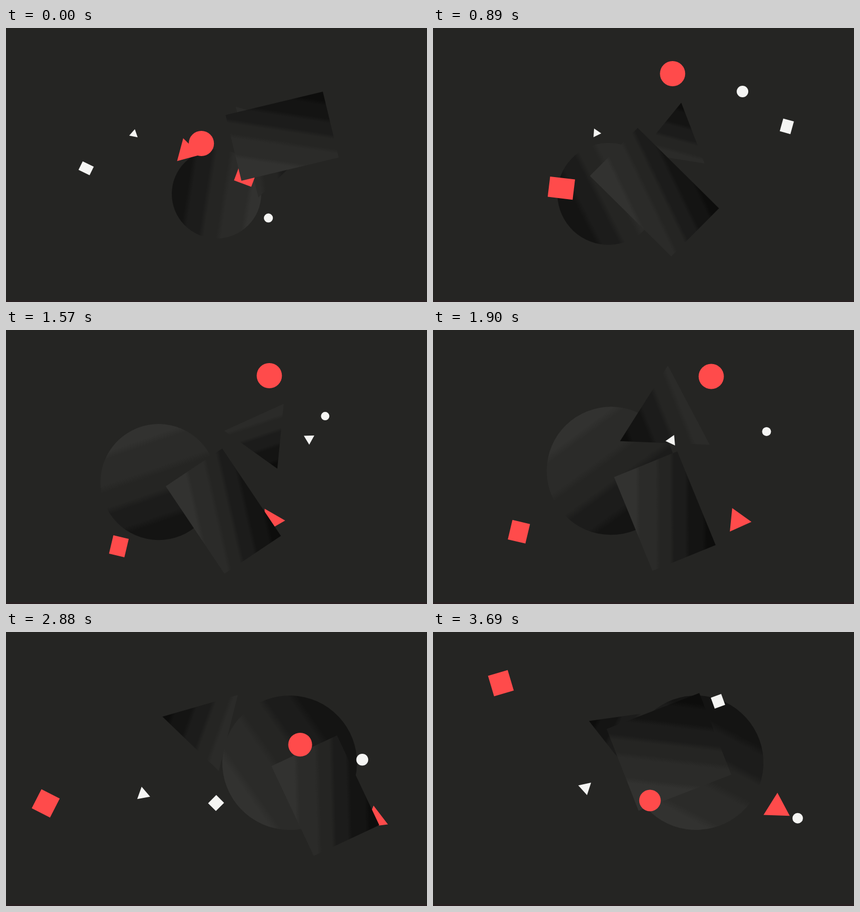
Write an HTML page with a canvas that moves like this. It is 800 px wide and 522 px high and loops after 3.79 s.

```html
<!DOCTYPE html>
<html lang="en">
<head>
<meta charset="utf-8">
<title>Floating shapes</title>
<style>
html, body { margin: 0; width: 100%; height: 100%; overflow: hidden; background: #252523; }
canvas { display: block; }
</style>
</head>
<body>
<canvas id="stage" width="800" height="522"></canvas>
<script>
const ctx = document.getElementById('stage').getContext('2d');
const LOOP = 3790;
const BACK = '#252523', RED = '#ff4b4b', WHITE = '#f5f5f3';
const SHADES = ['#0d0d0c', '#141413', '#1c1c1b', BACK, '#2b2b29', '#323230'];
const EDGES = [0.11, 0.28, 0.43, 0.57, 0.765];
const SOFT = 0.022;

let time = 0;

// Progress from 0 to 1 between two times in ms.
const ramp = (from, to) => Math.min(1, Math.max(0, (time - from) / (to - from)));
const smooth = s => s * s * (3 - 2 * s);
const ease = (from, to) => smooth(ramp(from, to));
const easeOut = (from, to) => Math.sin(ramp(from, to) * Math.PI / 2);
const bump = (center, half) => smooth(Math.max(0, 1 - Math.abs(time - center) / half));

// Soft-edged bands, from dark to light.
function bands(x1, y1, x2, y2) {
  const g = ctx.createLinearGradient(x1, y1, x2, y2);
  g.addColorStop(0, SHADES[0]);
  EDGES.forEach((edge, i) => {
    g.addColorStop(edge - SOFT, SHADES[i]);
    g.addColorStop(edge + SOFT, SHADES[i + 1]);
  });
  return g;
}
const SHADED = bands(0.353, -0.588, -0.353, 0.588);
const SHADED_TRI = bands(1.053, 0.124, -1.313, -0.124);

// Unit outlines: box and disc have side or diameter 1, the triangle radius 1.
function box() { ctx.rect(-0.5, -0.5, 1, 1); }
function disc() { ctx.arc(0, 0, 0.5, 0, Math.PI * 2); }
function triangle() {
  for (let i = 0; i < 3; i++) {
    const a = i * Math.PI * 2 / 3;
    ctx.lineTo(Math.cos(a), Math.sin(a));
  }
}

function draw(outline, fill, { x, y, turn = 0, w, h = w }) {
  ctx.save();
  ctx.translate(x, y);
  ctx.rotate(turn * Math.PI / 180);
  ctx.scale(w, h);
  ctx.beginPath();
  outline();
  ctx.fillStyle = fill;
  ctx.fill();
  ctx.restore();
}

// Each pose is a start value plus eased moves.
const darkDisc = () => ({
  x: 400 - 110 * ease(0, 1560) + 249 * ease(1560, 2770) - 39 * ease(2880, 3690),
  y: 316 - 67 * ease(920, 2440),
  turn: 248 - 36 * ramp(0, 890) - 82 * ease(890, 1570) - 37 * ramp(1570, 2290)
    - 69 * ease(2290, 2880) - 27 * ease(2880, 3690),
  w: 170 + 24 * ramp(0, 890) + 27 * ramp(890, 1570) + 35 * easeOut(1570, 2290)
});

const darkTriangle = () => ({
  x: 508 - 50 * ease(0, 440) + 28 * ease(740, 1570) - 99 * ease(1570, 2290) - 15 * ramp(2290, 3690),
  y: 224 - 11 * ramp(0, 890) - 14 * ramp(890, 1570) - 75 * ease(1570, 2290)
    + 58 * ease(2290, 2880) + 18 * ease(2880, 3690),
  turn: -14 - 68 * ease(0, 620) + 271 * ease(840, 2220) + 13 * ease(2290, 3690),
  w: 71.6 + 31.4 * bump(0, 440) + 61 * bump(2290, 720) + 10 * ease(2290, 3000)
});

const redTriangle = () => ({
  x: 343.5 + 161 * ease(0, 1570) + 197 * ease(1570, 2360) + 12 * ramp(2290, 2750)
    - 17 * easeOut(2750, 3020) - 43 * ease(3320, 3690),
  y: 235 + 128 * ease(0, 1570) + 46 * ease(1980, 2590) - 74 * ease(2620, 3026),
  turn: 15 - 15 * ease(0, 1570) + 22.6 * ramp(1570, 2880) + 9.4 * ramp(2880, 3690),
  w: 26 + 2.8 * ease(2880, 3690)
});

const redBox = () => ({
  x: 458 - 249.5 * ease(0, 440) + 35.5 * easeOut(440, 890) - 29.5 * easeOut(890, 1570)
    - 116.5 * ease(1570, 2290) - 22.5 * ease(2290, 2880) + 53.5 * ease(3130, 3690),
  y: 274 + 12 * ramp(0, 440) + 18.5 * ease(440, 890) + 107.5 * easeOut(890, 1220)
    - 63 * ease(1570, 2290) - 22.5 * ease(2290, 2880) - 229 * ease(2880, 3690),
  turn: 20.5 + 12.3 * ramp(0, 440) + 160.5 * ramp(440, 1570) + 13.7 * ease(2290, 2880)
    - 43.5 * ease(2880, 3690),
  w: 35 + 4 * easeOut(0, 1100) - 9 * bump(1570, 680),
  h: 47.7 - 7 * ease(890, 1570) - 4.7 * bump(1570, 680)
});

const whiteBox = () => ({
  x: 151.7 + 263 * ramp(0, 440) + 295 * easeOut(440, 1107) - 297 * ease(1107, 1570)
    - 13.5 * ease(2290, 2880) + 142.3 * ease(2880, 3690),
  y: 267.3 - 80 * ease(0, 440) + 167.5 * ease(890, 1500) - 29 * ease(2290, 2880)
    - 193.8 * ease(2880, 3690),
  turn: 26 - 28 * ease(0, 440) + 47 * easeOut(440, 2290) - 65 * ease(2880, 3690),
  w: 23.4 - 2.4 * ramp(0, 440),
  h: 18.2 + 3.8 * ramp(0, 440) + 3 * bump(890, 500)
});

const whiteTriangle = () => ({
  x: 243 + 9.7 * ramp(0, 440) + 57.6 * ease(440, 890) + 265.7 * ease(890, 1570)
    - 279 * ease(1570, 2290) - 36.7 * ease(2290, 2880) + 29.4 * ease(2880, 3690),
  y: 202 - 2 * ramp(0, 890) + 14.5 * ramp(890, 2290) + 94.5 * ease(2290, 2880)
    - 12.3 * ease(2880, 3690),
  turn: 41 - 37 * ramp(0, 440) - 100 * ease(1000, 2430) - 66 * ease(2730, 3690),
  w: 9.5 + 2 * ease(890, 1570) + 2.9 * ease(2290, 2880)
});

const whiteDisc = () => ({
  x: 498.5 + 108 * easeOut(0, 1430) + 62.2 * ease(1570, 2290) + 8.3 * ease(2290, 2880)
    + 16 * ease(2880, 3690),
  y: 362.3 - 144.5 * ramp(0, 440) - 96.8 * easeOut(440, 890) + 43 * ease(890, 1570)
    + 64.3 * ramp(1570, 2290) + 15 * ramp(2290, 2880) + 111.5 * ease(2880, 3690),
  w: 17.2 + 4.8 * ramp(0, 440) - 6 * ease(890, 1570) + 6.6 * ease(1570, 2880)
    - 2.6 * ramp(2880, 3690)
});

const darkBox = () => ({
  x: 524.7 - 98.7 * ease(0, 440) - 13 * ramp(440, 1570) + 194 * ease(1590, 2900)
    - 158.7 * ease(2880, 3690),
  y: 206 + 139 * easeOut(0, 1600) - 116.7 * ease(2440, 3690),
  turn: -13.6 + 66 * easeOut(0, 1290) + 24 * ease(1330, 2290) - 97.7 * ease(2660, 3690),
  w: 190 + 32 * easeOut(0, 440) - 33 * ease(480, 2290),
  h: 129 + 38 * (time / 3690) ** 6
});

const redDisc = () => ({
  x: 371 + 63 * easeOut(0, 440) + 67 * ease(440, 1640) + 63 * ease(1570, 2290)
    - 5 * ease(2290, 2880) - 146.7 * ease(2880, 3690),
  y: 220 - 150 * ease(0, 650) + 17 * ease(650, 890) + 40 * ease(1850, 2290)
    + 87.5 * ramp(2290, 2880) + 106.5 * ramp(2880, 3690),
  w: 48 - 7 * ease(2290, 3690)
});

function frame() {
  time = Math.min(performance.now() % LOOP, 3690);
  ctx.fillStyle = BACK;
  ctx.fillRect(0, 0, 800, 522);
  draw(disc, SHADED, darkDisc());
  draw(triangle, SHADED_TRI, darkTriangle());
  draw(triangle, RED, redTriangle());
  draw(box, RED, redBox());
  draw(box, WHITE, whiteBox());
  draw(triangle, WHITE, whiteTriangle());
  draw(disc, WHITE, whiteDisc());
  draw(box, SHADED, darkBox());
  draw(disc, RED, redDisc());
  ctx.fillStyle = '#2a2022';
  ctx.fillRect(0, 519, 800, 3);
  requestAnimationFrame(frame);
}
frame();
</script>
</body>
</html>
```
